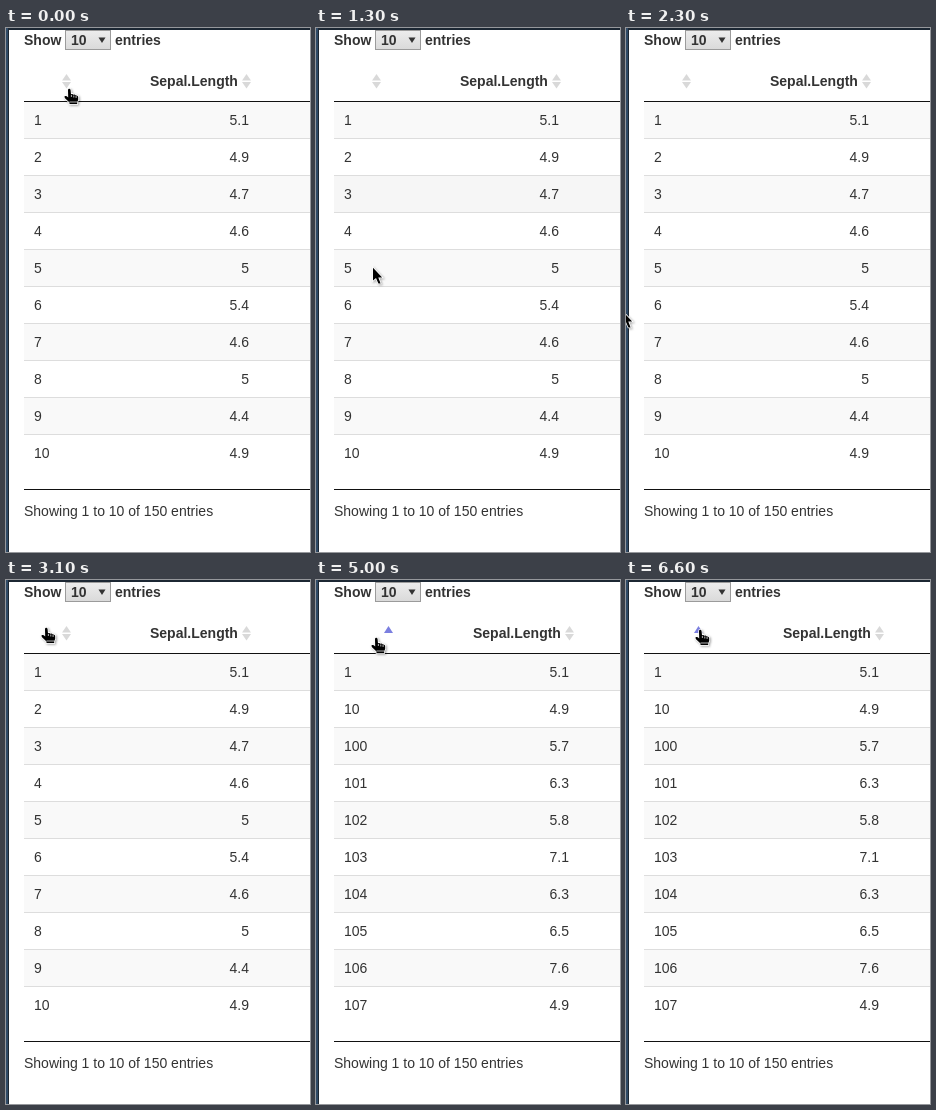
An HTML page for the animation above (8000 ms loop, 304x524 px).

```html
<!DOCTYPE html>
<html lang="en">
<head>
<meta charset="utf-8">
<title>Sortable table</title>
<style>
  html, body { margin: 0; width: 100%; height: 100%; overflow: hidden; background: #fff; }
  body { position: relative; font: 14px/20px "Liberation Sans", Arial, sans-serif; color: #333; }
  body > * { position: absolute; white-space: nowrap; }
  b { top: 2px; }
  .select { left: 59px; top: 2px; width: 39px; height: 18px; padding-left: 5px; border: 1px solid #9b9b9b;
    font-weight: bold; line-height: 18px; background: linear-gradient(#ececec, #dadada); }
  #heading { left: 144px; top: 43px; }
  #rows { left: 18px; top: 74px; width: 286px; }
  .row { position: relative; height: 20px; padding: 8px 10px; border-bottom: 1px solid #ddd; }
  .row:nth-child(odd) { background: #f9f9f9; }
  .row.hover { background: #f6f6f6; }
  .row:last-child { border: 0; }
  .row span { position: absolute; right: 61px; }
  .sorted #heading { left: 157px; }
  .sorted .row span { right: 51px; }
  .info { left: 18px; top: 473px; }
  svg { left: 0; top: 0; }
  #pointer { filter: drop-shadow(1px 1px 1px #0005); }
  .shape { fill: #000; stroke: #fff; stroke-width: 1.6; paint-order: stroke; }
  .creases { fill: none; stroke: #fff; stroke-width: .7; }
</style>
</head>
<body>
<b style="left:18px">Show</b>
<div class="select">10</div>
<b style="left:109px">entries</b>
<b id="heading">Sepal.Length</b>
<div id="rows"></div>
<div class="info">Showing 1 to 10 of 150 entries</div>
<svg width="304" height="524">
  <defs>
    <g id="both" fill="#d9d9d9"><path d="M0 0L4.5 6.5H-4.5Z"/><path d="M-4.5 8H4.5L0 14.5Z"/></g>
    <path id="ascending" fill="#7b7fe0" d="M0 0L4.5 7H-4.5Z"/>
    <g id="hand">
      <path class="shape" d="M5 2.2Q5 .8 6.2 .8T7.6 2.2L8 6.2Q9.6 5.4 10.4 6.8Q12 6.2 12.8 7.5Q15 7 15.2 9V12L14.2 14V16H6.5V14.5L2 10.2Q.8 8.6 2 8Q3.5 7.6 5.2 9.4Z"/>
      <path class="creases" d="M8.4 7v2M10.8 7.5v2M13.1 8v2M6.5 14H14.2"/>
    </g>
    <path id="arrow" class="shape" d="M0 .8V13.6L3 10.9L5.4 16.4H7.6L5.3 10.4H9.2Z"/>
  </defs>
  <path fill="#2f4a66" d="M0 0H2V524H0Z"/>
  <path fill="#1c2733" d="M2 0H304V2H3V524H2Z"/>
  <path fill="#111" d="M18 73H304V74H18ZM18 461H304V462H18Z"/>
  <path fill="#333" d="M92.5 9.5H99.5L96 15Z"/>
  <use id="idSort"/>
  <use id="lengthSort" href="#both"/>
  <use id="pointer"/>
</svg>
<script>
const LOOP = 8000, TICK = 100, SORT_AT = 5, ROW = 37, TOP = 74, LEFT = 18;
const [rows, idSort, lengthSort, pointer] =
  ['rows', 'idSort', 'lengthSort', 'pointer'].map(id => document.getElementById(id));

const ids = Array.from({ length: 150 }, (_, i) => String(i + 1));
const firstPage = ids.slice(0, 10);
const sortedPage = [...ids].sort().slice(0, 10);

// Sepal lengths of flowers 1 to 10 and 100 to 107
const early = '5.1 4.9 4.7 4.6 5 5.4 4.6 5 4.4 4.9'.split(' ');
const late = '5.7 6.3 5.8 7.1 6.3 6.5 7.6 4.9'.split(' ');
const lengthOf = id => id < 100 ? early[id - 1] : late[id - 100];

const linear = u => u;
const easeIn = u => u * u;
const easeOut = u => u * (2 - u);

// Pointer stops: seconds, x, y, easing of the move that leads there
const stops = [
  [0.8, 57, 60, linear],
  [1.3, 57, 239, easeIn],
  [1.8, 38, 469, easeOut],
  [2.3, -3, 283, easeIn],
  [2.4, -9, 201, linear],
  [2.6, -9, 201, linear],
  [2.7, -4, 195, linear],
  [3.1, 34, 47, easeIn],
  [3.3, 55, 51, linear],
  [3.4, 55, 51, linear],
  [3.5, 56, 65, linear],
  [3.6, 55, 53, linear],
  [3.9, 54, 57, linear],
  [5.8, 54, 57, linear],
  [6.2, 72, 56, linear],
  [6.3, 72, 56, linear],
  [6.6, 68, 49, linear]
];

function pointerAt(time) {
  const next = stops.findIndex(stop => stop[0] > time);
  if (next < 1) return stops.at(next).slice(1, 3);
  const [t0, x0, y0] = stops[next - 1];
  const [t1, x1, y1, ease] = stops[next];
  const u = ease((time - t0) / (t1 - t0));
  return [x0 + (x1 - x0) * u, y0 + (y1 - y0) * u].map(Math.round);
}

function rowUnder([x, y]) {
  return x < LEFT ? -1 : Math.floor((y - TOP) / ROW);
}

function place(element, shape, x, y) {
  element.setAttribute('href', '#' + shape);
  element.setAttribute('transform', `translate(${x} ${y})`);
}

function draw(tick) {
  const time = tick * TICK / 1000;
  const sorted = time >= SORT_AT;
  // Row highlighting trails the pointer by one tick
  const hover = rowUnder(pointerAt((tick - 1) * TICK / 1000));
  document.body.className = sorted ? 'sorted' : '';
  rows.innerHTML = (sorted ? sortedPage : firstPage).map((id, i) =>
    `<div class="row${i === hover ? ' hover' : ''}">${id}<span>${lengthOf(id)}</span></div>`).join('');
  place(idSort, sorted ? 'ascending' : 'both', sorted ? 72.5 : 60.5, 46);
  place(lengthSort, 'both', sorted ? 253.5 : 240.5, 46);
  const [x, y] = pointerAt(time);
  place(pointer, y < TOP ? 'hand' : 'arrow', x, y);
}

let shown = -1;
function frame(now) {
  const tick = Math.floor(now % LOOP / TICK);
  if (tick !== shown) draw(shown = tick);
  requestAnimationFrame(frame);
}
frame(0);
</script>
</body>
</html>
```
